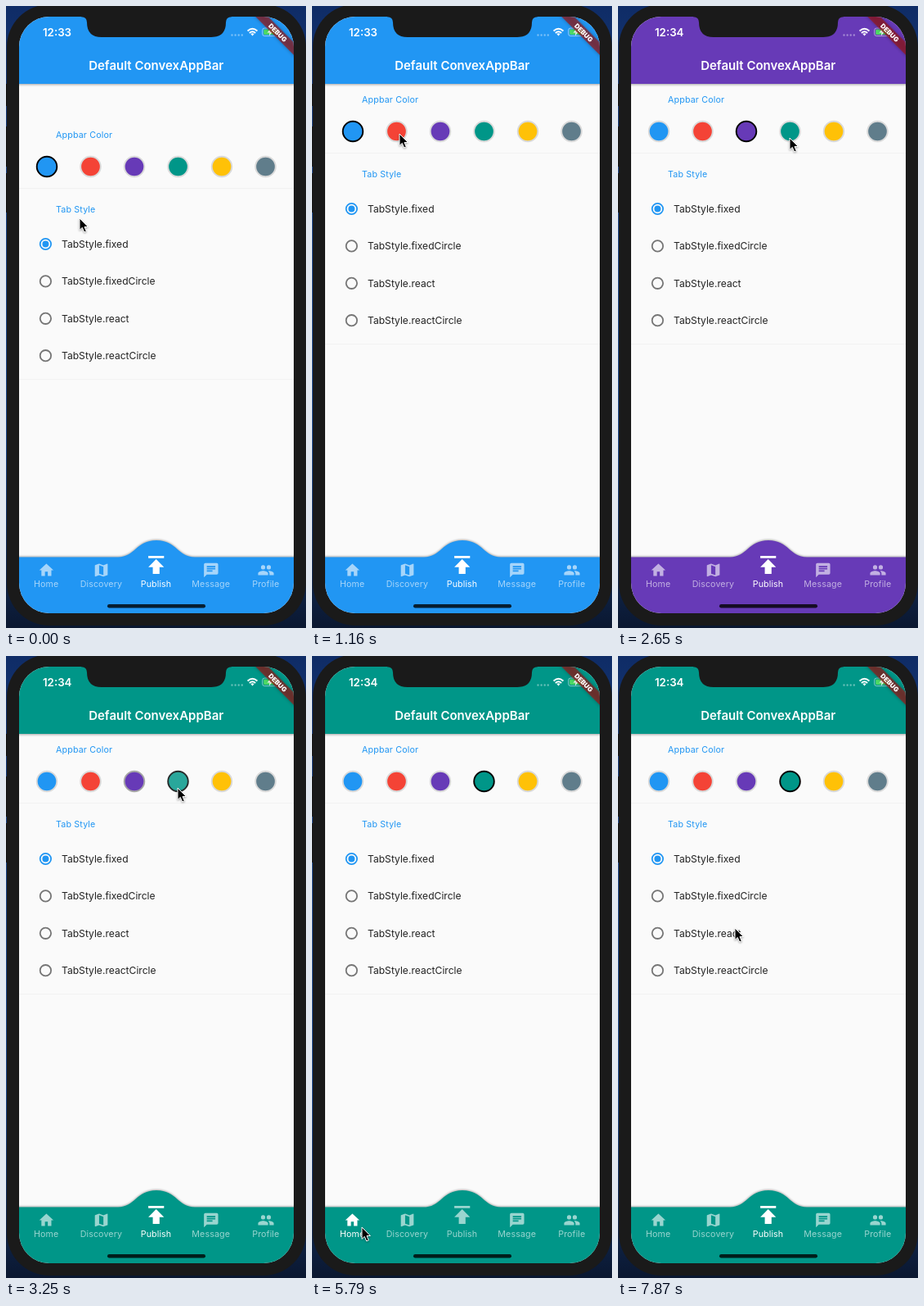
An HTML page that plays this animation: 367 by 759 pixels, repeating every 8000 ms.

```html
<!DOCTYPE html>
<html lang="en">
<head>
<meta charset="utf-8">
<title>Default ConvexAppBar</title>
<style>
html, body { margin: 0; width: 100%; height: 100%; overflow: hidden; background: #0d2450; }
svg { display: block; width: 100vw; height: 100vh; }
text { font-family: Inter, "Open Sans", sans-serif; }
.head { font-size: 10.7px; letter-spacing: .15px; fill: #2196f3; }
.opt { font-size: 12.1px; fill: #222; }
.tab { font-size: 10.7px; letter-spacing: .1px; text-anchor: middle; }
#top { filter: drop-shadow(0 1px 1.5px rgba(0, 0, 0, .35)); }
#bottom { filter: drop-shadow(0 -1px 1px rgba(0, 0, 0, .3)); }
#ribbon { filter: drop-shadow(0 0 2px rgba(0, 0, 0, .5)); }
#cursor { filter: drop-shadow(0 1px 1px rgba(0, 0, 0, .35)); }
</style>
</head>
<body>
<svg viewBox="0 0 367 759" preserveAspectRatio="none">
  <defs>
    <linearGradient id="night" x1="0" y1="0" x2="0" y2="1">
      <stop offset="0" stop-color="#0f2c66"/>
      <stop offset=".3" stop-color="#1d4688"/>
      <stop offset=".7" stop-color="#1f4c90"/>
      <stop offset="1" stop-color="#0a1730"/>
    </linearGradient>
    <clipPath id="screen"><rect x="16" y="13" width="336" height="728" rx="37"/></clipPath>
  </defs>
  <rect width="367" height="759" fill="url(#night)"/>
  <path d="M0 95h2v27H0zM0 147h2v49H0zM0 204h2v48H0z" fill="#111"/>
  <rect x="1" y="-2" width="366" height="758" rx="52" fill="#1a1a1a"/>

  <g clip-path="url(#screen)">
    <rect x="16" y="13" width="336" height="728" fill="#fafafa"/>
    <g id="list">
      <path d="M16 179.7H352M16 412.7H352" stroke="#f1f1f1"/>
      <text class="head" x="61" y="118">Appbar Color</text>
      <text class="head" x="61" y="209">Tab Style</text>
    </g>
    <rect id="top" x="10" y="8" width="348" height="87"/>
    <path id="bottom" d="M10 672.5H137C158 672.5 159 652 184 652S210 672.5 231 672.5H358V746H10Z"/>
    <g id="tabs"></g>
    <rect x="124" y="730" width="120" height="4.5" rx="2.2" fill="#000" fill-opacity=".8"/>

    <text x="183.7" y="77.5" text-anchor="middle" font-size="15" font-weight="600" fill="#fff">Default ConvexAppBar</text>
    <text id="clock" x="45" y="36.7" font-size="13.3" font-weight="600" fill="#fff"></text>
    <path d="M276.5 35.5H290" stroke="#fff" stroke-opacity=".4" stroke-width="2.4" stroke-linecap="round" stroke-dasharray="0 4.1"/>
    <g fill="none" stroke="#fff" stroke-width="2">
      <path d="M295.6 30.4Q301.5 25 307.4 30.4M297.9 33Q301.5 29.6 305.1 33"/>
      <path d="M299.4 34.1Q301.5 32.6 303.6 34.1L301.5 36.6Z" fill="#fff" stroke="none"/>
    </g>
    <rect x="313.7" y="27" width="20" height="9.6" rx="2.6" fill="none" stroke="#fff" stroke-opacity=".5"/>
    <rect x="315.2" y="28.5" width="17" height="6.6" rx="1.4" fill="#4cd964"/>
    <path d="M323.8 27.6L319.6 32.6H322.6L321.8 36.4L326 31.2H323Z" fill="#fff"/>

    <g transform="translate(352 13) rotate(45)">
      <rect id="ribbon" x="-40" y="22.2" width="80" height="10.8" fill="#b71c1c" fill-opacity=".63"/>
      <rect x="-40" y="22.2" width="80" height="10.8" fill="#300" fill-opacity=".15"/>
      <text x="0" y="30.6" text-anchor="middle" font-size="8" font-weight="900" fill="#fff">DEBUG</text>
    </g>
  </g>

  <path d="M92 12H276V13.2Q269 13.5 269 20Q269 38 251 38H117Q99 38 99 20Q99 13.5 92 13.2Z" fill="#1a1a1a"/>
  <path id="cursor" d="M0 0V14.4L3.3 11.4L5.7 17L8.3 15.9L6 10.5H10.4Z" fill="#000" stroke="#fff" stroke-width="1"/>
</svg>
<script>
const LOOP = 8000;
const $ = id => document.getElementById(id);

function add(parent, name, attrs, text) {
  const el = document.createElementNS('http://www.w3.org/2000/svg', name);
  set(el, attrs);
  if (text) el.textContent = text;
  parent.appendChild(el);
  return el;
}
function set(el, attrs) {
  for (const k in attrs) el.setAttribute(k, attrs[k]);
}

const colors = ['#2196f3', '#f44336', '#673ab7', '#009688', '#ffc107', '#607d8b'];
const dots = colors.map((fill, i) => {
  const at = { cx: 50 + i * 53.5, cy: 153 };
  add($('list'), 'circle', { ...at, r: 12, fill });
  return {
    glow: add($('list'), 'circle', { ...at, r: 12, fill: '#fff' }),
    ring: add($('list'), 'circle', { ...at, r: 12.3, fill: 'none', 'stroke-width': 1.9 })
  };
});

['fixed', 'fixedCircle', 'react', 'reactCircle'].forEach((style, i) => {
  const cy = 247.5 + i * 45.4;
  const tint = i ? '#757575' : '#2196f3';
  add($('list'), 'circle', { cx: 48.4, cy, r: 6.7, fill: 'none', stroke: tint, 'stroke-width': 1.8 });
  if (!i) add($('list'), 'circle', { cx: 48.4, cy, r: 4, fill: tint });
  add($('list'), 'text', { class: 'opt', x: 68, y: cy + 4.5 }, 'TabStyle.' + style);
});

const icons = {
  Home: 'M10 20v-6h4v6h5v-8h3L12 3 2 12h3v8z',
  Discovery: 'M20.5 3L15 5.1 9 3 3.4 4.9Q3 5 3 5.4V20.5Q3 21 3.5 21L9 18.9l6 2.1 5.6-1.9Q21 19 21 18.6V3.5Q21 3 20.5 3zM15 19l-6-2.1V5l6 2.1z',
  Publish: 'M5 4v2h14V4zM5 14h4v6h6v-6h4l-7-7z',
  Message: 'M20 2H4Q2 2 2 4V22l4-4h14q2 0 2-2V4q0-2-2-2zM6 9h12v2H6zM14 14H6v-2h8zM18 8H6V6h12z',
  Profile: 'M13 8a3 3 0 1 1 6 0a3 3 0 1 1-6 0zM5 8a3 3 0 1 1 6 0a3 3 0 1 1-6 0zM8 13c-2.3 0-7 1.2-7 3.5V19h14v-2.5c0-2.3-4.7-3.5-7-3.5zM16 13l-1 .1q2 1.4 2 3.4V19h6v-2.5c0-2.3-4.7-3.5-7-3.5z'
};
const tabs = Object.keys(icons).map((name, i) => {
  const x = 49.2 + i * 67.15;
  const g = add($('tabs'), 'g', { fill: '#fff' });
  const [k, y] = name === 'Publish' ? [1.37, 665.5] : [.87, 678];
  add(g, 'path', { d: icons[name], 'fill-rule': 'evenodd', transform: `translate(${x + .2 - 12 * k} ${y}) scale(${k})` });
  add(g, 'text', { class: 'tab', x, y: 708.6 }, name);
  return g;
});

const runs = [
  [420, 1160, 6], [1610, 2050, 4], [2350, 2650, 3], [3250, 4290, 8], [4440, 4440, 1],
  [5790, 5940, 2], [6230, 6380, 2], [6830, 7280, 4], [7570, 7870, 3]
];
const ticks = [0, ...runs.flatMap(([a, b, n]) =>
  Array.from({ length: n }, (_, i) => Math.round(a + (b - a) * i / Math.max(1, n - 1))))];

// [time, x, y]
const path = [
  [0, 90, 259], [320, 90, 259], [860, 91, 208], [1160, 107, 156],
  [1610, 107, 156], [2050, 153, 155],
  [2350, 153, 155], [2650, 210, 161],
  [3250, 210, 161], [4290, 77, 699], [4440, 61, 697],
  [6080, 61, 697], [6380, 126, 699],
  [6830, 126, 699], [7280, 199, 699],
  [7570, 199, 699], [7870, 143, 332]
];
const drag = [[320, 43], [860, 0]];
const picks = [[0, 0], [1610, 1], [2350, 2], [3250, 3]];
const taps = [[0, 2], [5790, 0], [6830, 1], [7570, 2]];

const ease = u => u * u * (3 - 2 * u);
const last = (list, t) => list.filter(k => k[0] <= t).pop();

function tween(keys, t) {
  const i = keys.findIndex(k => k[0] > t);
  if (i < 0) return keys[keys.length - 1].slice(1);
  if (!i) return keys[0].slice(1);
  const a = keys[i - 1], b = keys[i];
  const u = ease((t - a[0]) / (b[0] - a[0]));
  return a.slice(1).map((v, j) => v + (b[j + 1] - v) * u);
}

function draw(time) {
  const t = ticks.filter(k => k <= time).pop();
  const [picked, color] = last(picks, t);
  const fresh = t > 0 && t === picked;

  set($('top'), { fill: colors[color] });
  set($('bottom'), { fill: colors[color] });
  dots.forEach(({ glow, ring }, i) => {
    const on = i === color;
    const fading = fresh && i === color - 1;
    set(glow, { 'fill-opacity': on && fresh ? .16 : 0 });
    set(ring, { stroke: on ? (fresh ? '#262b2b' : '#000') : fading ? '#a6a6a6' : '#d9d9d9' });
  });

  const active = last(taps, t)[1];
  tabs.forEach((g, i) => set(g, { 'fill-opacity': i === active ? 1 : .6 }));

  $('clock').textContent = t < 2500 ? '12:33' : '12:34';
  set($('list'), { transform: `translate(0 ${tween(drag, t)[0].toFixed(2)})` });
  set($('cursor'), { transform: `translate(${tween(path, t).map(v => v.toFixed(2)).join(' ')})` });
}

const start = performance.now();
function frame() {
  draw((performance.now() - start) % LOOP);
  requestAnimationFrame(frame);
}
draw(0);
requestAnimationFrame(frame);
</script>
</body>
</html>
```
